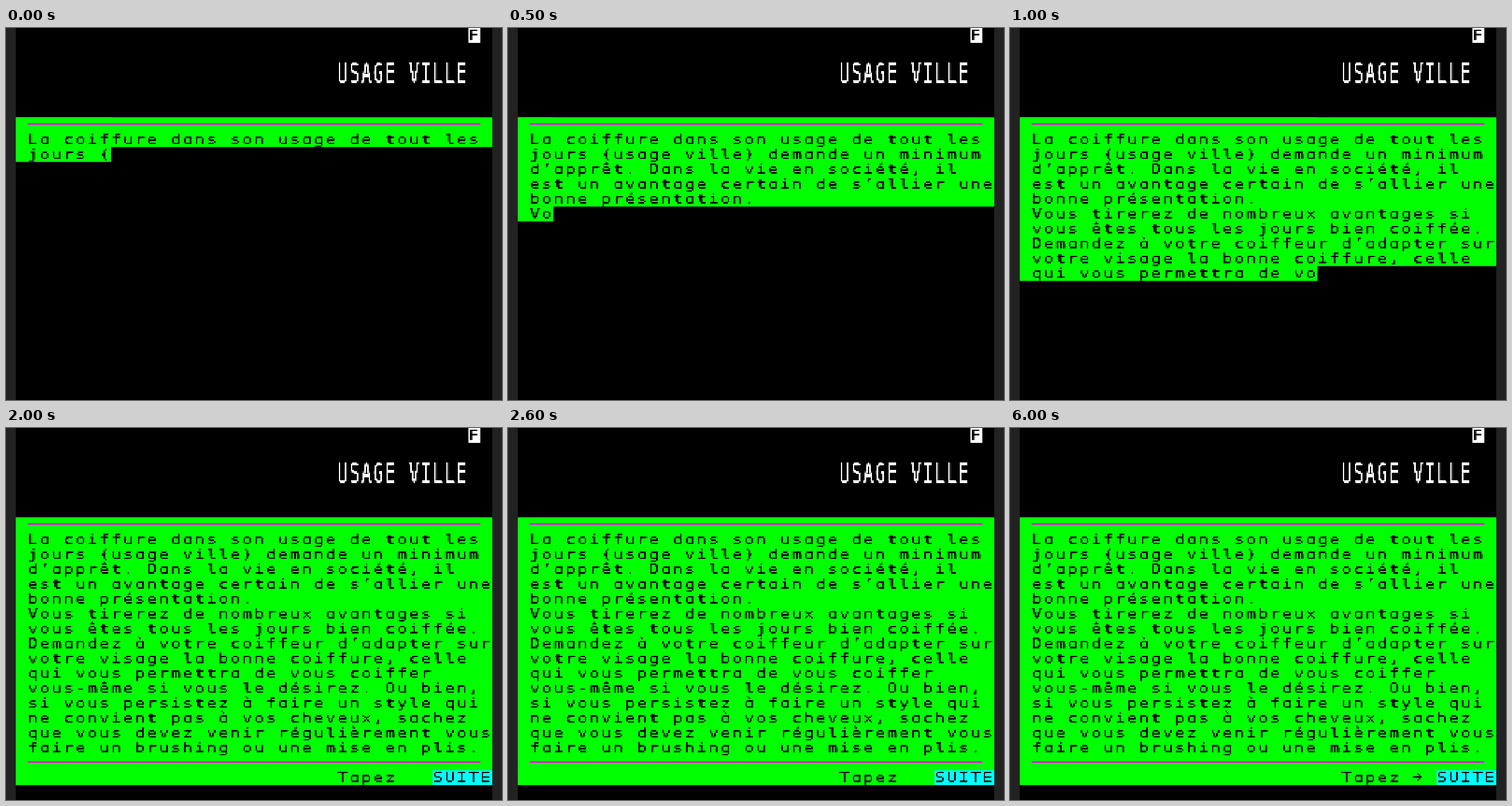
These frames come from a looping animation (864 px wide and 648 px high, 8000 ms). An HTML page with a canvas:

```html
<!DOCTYPE html>
<html lang="fr">
<head>
<meta charset="utf-8">
<title>Usage ville</title>
<style>
  html, body { margin: 0; width: 100%; height: 100%; overflow: hidden; background: #000; }
  canvas { display: block; width: 864px; height: 648px; }
</style>
</head>
<body>
<canvas id="screen" width="864" height="648"></canvas>
<script>
const ctx = document.getElementById('screen').getContext('2d');

// Videotex page: 40 x 25 cells, each 8 x 10 dots
const W = 864, H = 648, LEFT = 17, COLS = 40, ROWS = 25;
const DOTS_X = COLS * 8, DOTS_Y = ROWS * 10;
const PAGE_W = W - 2 * LEFT;
const DOT_W = PAGE_W / DOTS_X, DOT_H = H / DOTS_Y;
const LOOP = 8000;
const GREEN = '#00ff00', MAGENTA = '#ff00ff', CYAN = '#00ffff';

const TOP_ROW = 6, TEXT_ROW = 7, RULE_ROW = 22, PROMPT_ROW = 23;
const LINES = [
  'La coiffure dans son usage de tout les',
  'jours (usage ville) demande un minimum',
  'd’apprêt. Dans la vie en société, il',
  'est un avantage certain de s’allier une',
  'bonne présentation.',
  'Vous tirerez de nombreux avantages si',
  'vous êtes tous les jours bien coiffée.',
  'Demandez à votre coiffeur d’adapter sur',
  'votre visage la bonne coiffure, celle',
  'qui vous permettra de vous coiffer',
  'vous-même si vous le désirez. Ou bien,',
  'si vous persistez à faire un style qui',
  'ne convient pas à vos cheveux, sachez',
  'que vous devez venir régulièrement vous',
  'faire un brushing ou une mise en plis.'
];

// The page arrives in bursts; each leaves the write position at a row and column
const BURSTS = [
  { at: 0, row: 8, col: 8 },
  { at: 500, row: 12, col: 3 },
  { at: 1000, row: 16, col: 25 },
  { at: 1500, row: 20, col: 11 },
  { at: 2000, row: 24, col: 0 }
];
const ARROW_AT = 3000;

// Text is set on a layer with one pixel per dot, then enlarged
const layer = document.createElement('canvas');
layer.width = DOTS_X;
layer.height = DOTS_Y;
const ink = layer.getContext('2d', { willReadFrequently: true });
ink.font = '93px "DejaVu Sans Mono", monospace';
ink.textBaseline = 'alphabetic';
const GLYPH_X = 7 / ink.measureText('0').width, GLYPH_Y = 0.1;

function dots(x, y, w, h, color) {
  ctx.fillStyle = color;
  ctx.fillRect(LEFT + x * DOT_W, y * DOT_H, w * DOT_W, h * DOT_H);
}

function cells(col, row, cols, rows, color) {
  dots(col * 8, row * 10, cols * 8, rows * 10, color);
}

// Round, single-storey a
const glyph = c => c === 'a' ? 'ɑ' : c === 'à' ? 'ɑ\u0300' : c;

function write(text, col, baseline, color, tall = 1) {
  ink.fillStyle = color;
  [...text].forEach((c, i) => {
    ink.save();
    ink.translate((col + i) * 8, baseline);
    ink.scale(GLYPH_X, GLYPH_Y * tall);
    ink.fillText(glyph(c), 0, 0);
    ink.restore();
  });
}

const writeRow = (text, col, row, color) => write(text, col, row * 10 + 8, color);

// Turns smooth letter edges into hard dots
function stampText() {
  const image = ink.getImageData(0, 0, DOTS_X, DOTS_Y), px = image.data;
  for (let i = 3; i < px.length; i += 4) px[i] = (px[i] - 85) / 55 * 255;
  ink.putImageData(image, 0, 0);
  ctx.imageSmoothingEnabled = false;
  ctx.drawImage(layer, LEFT, 0, PAGE_W, H);
}

function rule(row) {
  dots(8, row * 10 + 4, DOTS_X - 16, 1, MAGENTA);
}

function arrow(col, row) {
  const x = col * 8, y = row * 10 + 4;
  dots(x, y, 6, 1, '#000');
  for (const side of [-1, 1]) {
    dots(x + 4, y + side, 1, 1, '#000');
    dots(x + 3, y + 2 * side, 1, 1, '#000');
  }
}

function header() {
  cells(38, 0, 1, 1, '#fff');
  writeRow('F', 38, 0, '#000');
  write('USAGE VILLE', 27, 37, '#fff', 2);
}

function page(row, col) {
  cells(0, TOP_ROW, COLS, row - TOP_ROW, GREEN);
  cells(0, TOP_ROW, col, row - TOP_ROW + 1, GREEN);
  rule(TOP_ROW);
  LINES.forEach((line, i) => {
    const y = TEXT_ROW + i;
    if (y > row) return;
    const shown = y < row ? line : line.slice(0, col - 1);
    writeRow(shown, 1, y, '#000');
  });
}

function prompt(withArrow) {
  rule(RULE_ROW);
  writeRow('Tapez', 27, PROMPT_ROW, '#000');
  if (withArrow) arrow(33, PROMPT_ROW);
  cells(35, PROMPT_ROW, 5, 1, CYAN);
  writeRow('SUITE', 35, PROMPT_ROW, '#000');
}

function draw(t) {
  ctx.fillStyle = '#222';
  ctx.fillRect(0, 0, W, H);
  cells(0, 0, COLS, ROWS, '#000');
  ink.clearRect(0, 0, DOTS_X, DOTS_Y);
  header();
  const burst = BURSTS.filter(b => b.at <= t).pop();
  page(burst.row, burst.col);
  if (burst.row > PROMPT_ROW) prompt(t >= ARROW_AT);
  stampText();
}

const start = performance.now();
function tick() {
  draw((performance.now() - start) % LOOP);
  requestAnimationFrame(tick);
}
tick();
</script>
</body>
</html>
```
